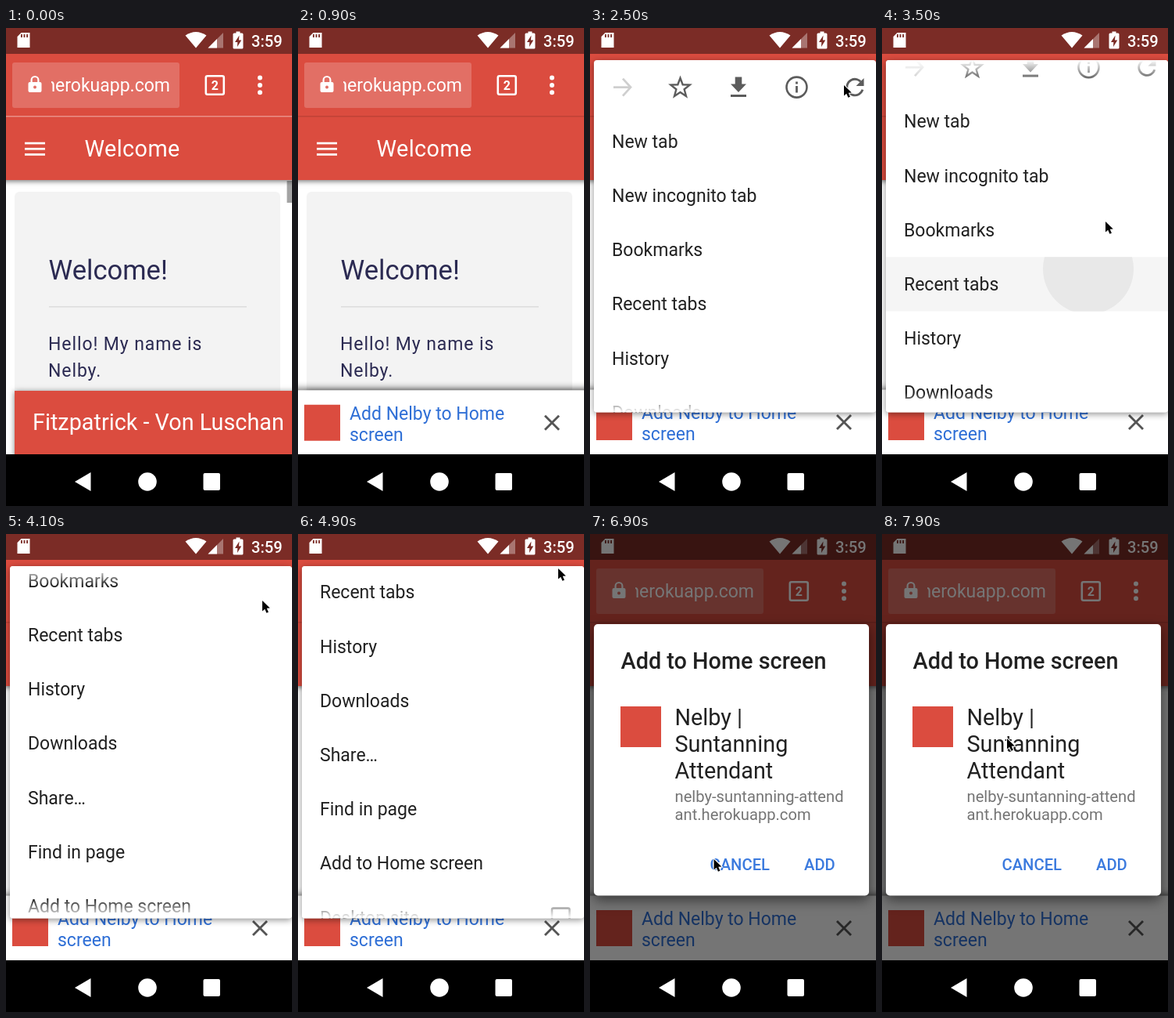
An HTML page with a canvas for the animation above (8000 ms loop, 366 by 610 pixels).

```html
<!DOCTYPE html>
<html lang="en">
<head>
<meta charset="utf-8">
<title>Add to Home screen</title>
<style>
html, body { margin: 0; width: 100%; height: 100%; overflow: hidden; background: #000; }
canvas { display: block; width: 366px; height: 610px; }
</style>
</head>
<body>
<canvas id="stage"></canvas>
<script>
const W = 366, H = 610, LOOP = 8000, STEP = 100;
const RED = '#db4c3f', NAVY = '#2b2a52', BLUE = '#2f6fd6';
const ratio = window.devicePixelRatio || 1;

function makeLayer(canvas) {
  canvas.width = W * ratio;
  canvas.height = H * ratio;
  const ctx = canvas.getContext('2d');
  ctx.scale(ratio, ratio);
  return ctx;
}
const stage = makeLayer(document.getElementById('stage'));
const layer = makeLayer(document.createElement('canvas'));
let g = stage;

// Piecewise linear value from [time, value] pairs.
function track(keys, t) {
  if (t <= keys[0][0]) return keys[0][1];
  for (let i = 1; i < keys.length; i++) {
    const [t0, v0] = keys[i - 1], [t1, v1] = keys[i];
    if (t <= t1) return v0 + (v1 - v0) * (t - t0) / (t1 - t0);
  }
  return keys[keys.length - 1][1];
}
const ramp = (t, a, b) => Math.min(1, Math.max(0, (t - a) / (b - a)));
const easeOut = p => 1 - (1 - p) ** 3;

function rect(x, y, w, h, color, r = 0) {
  g.fillStyle = color;
  g.beginPath();
  g.roundRect(x, y, w, h, r);
  g.fill();
}
function disc(x, y, r, color) {
  g.fillStyle = color;
  g.beginPath();
  g.arc(x, y, r, 0, 7);
  g.fill();
}
function poly(points, color) {
  g.fillStyle = color;
  g.beginPath();
  points.forEach(([x, y]) => g.lineTo(x, y));
  g.closePath();
  g.fill();
}
function line(points, color, width) {
  g.strokeStyle = color;
  g.lineWidth = width;
  g.beginPath();
  points.forEach(([x, y], i) => i ? g.lineTo(x, y) : g.moveTo(x, y));
  g.stroke();
}
function frame(x, y, w, h, color, width, r = 0) {
  g.strokeStyle = color;
  g.lineWidth = width;
  g.beginPath();
  g.roundRect(x, y, w, h, r);
  g.stroke();
}
function text(s, x, y, size, color, { weight = 400, space = 0, align = 'left' } = {}) {
  g.font = `${weight} ${size}px Roboto, sans-serif`;
  g.letterSpacing = space + 'px';
  g.textAlign = align;
  g.fillStyle = color;
  g.fillText(s, x, y);
}
function shadowed(blur, dy, alpha, draw) {
  g.save();
  g.shadowColor = `rgba(0,0,0,${alpha})`;
  g.shadowBlur = blur * ratio;
  g.shadowOffsetY = dy * ratio;
  draw();
  g.restore();
}
function clipTo(x, y, w, h, r, draw) {
  g.save();
  g.beginPath();
  g.roundRect(x, y, w, h, r);
  g.clip();
  draw();
  g.restore();
}

function statusBar() {
  rect(0, 0, W, 33, '#7b2c26');
  poly([[19.5, 6], [30.5, 6], [30.5, 25], [14.5, 25], [14.5, 11]], '#fff');
  for (let i = 0; i < 3; i++) rect(19 + i * 3.6, 8, 1.8, 4, '#7b2c26');
  g.fillStyle = '#fff';
  g.beginPath();
  g.moveTo(243, 25.5);
  g.lineTo(229.5, 9.5);
  g.quadraticCurveTo(243, 0.5, 256.5, 9.5);
  g.fill();
  poly([[278, 6], [278, 25.5], [258.5, 25.5]], 'rgba(255,255,255,.35)');
  poly([[270, 14], [270, 25.5], [258.5, 25.5]], '#fff');
  rect(294.5, 4.5, 5, 4, '#fff');
  rect(290.5, 6.5, 13, 20, '#fff', 1.5);
  poly([[298.5, 9.5], [293, 18], [296.3, 18], [296, 24], [301.3, 15.5], [298, 15.5]], '#7b2c26');
  text('3:59', 314, 23.5, 20.2, '#fff', { weight: 500 });
}

function browserBar(t) {
  rect(0, 33, W, 80, RED);
  rect(8, 44, 214, 58, '#e26f65', 3);
  rect(28.5, 69, 17, 13, '#fff', 2);
  g.strokeStyle = '#fff';
  g.lineWidth = 2.2;
  g.beginPath();
  g.moveTo(32.6, 70);
  g.lineTo(32.6, 66.4);
  g.arc(37, 66.4, 4.4, Math.PI, 0);
  g.lineTo(41.4, 70);
  g.stroke();
  disc(37, 75.5, 2, '#e26f65');
  clipTo(58, 44, 164, 58, 0, () =>
    text('herokuapp.com', 210, 80.5, 23, '#fff', { align: 'right' }));
  frame(255.8, 61.3, 23, 23.4, '#fff', 2.6, 2);
  text('2', 267.3, 79, 16, '#fff', { weight: 700, align: 'center' });
  for (let i = 0; i < 3; i++) disc(325, 63.6 + i * 9.3, 3, '#fff');
  rect(0, 112, W, 1.5, t < 300 ? '#ea9088' : '#c04236');
}

function page(t) {
  rect(0, 113, W, 431, '#fff');
  rect(11, 209, 340, 335, '#f3f3f3', 6);
  text('Welcome!', 54.5, 321, 34.6, NAVY);
  rect(55, 355, 253, 1.6, '#dcdcdc');
  text('Hello! My name is', 54, 410.5, 23, NAVY, { space: 0.9 });
  text('Nelby.', 54, 445, 23, NAVY, { space: 0.9 });
  shadowed(7, 1, 0.5, () => rect(11, 463, 360, 90, RED));
  text('Fitzpatrick - Von Luschan', 34, 512.5, 28.8, '#fff');
  const bar = 1 - ramp(t, 300, 700);
  if (bar) rect(359.5, 195, 6.5, 28, `rgba(140,140,140,${0.8 * bar})`);
  shadowed(6, 2, 0.5, () => rect(-10, 113, W + 20, 81, RED));
  for (let i = 0; i < 3; i++) rect(24, 145.7 + i * 7.2, 26, 2.7, '#fff');
  text('Welcome', 100.5, 164, 28.8, '#fff', { space: 0.4 });
}

function banner(t) {
  const p = easeOut(ramp(t, 500, 1000));
  if (!p) return;
  clipTo(0, 0, W, 544, 0, () => {
    g.translate(0, 84 * (1 - p));
    shadowed(9, -2, 0.6, () => rect(-12, 461.5, W + 24, 90, '#fff'));
    rect(8, 480, 46, 46, RED);
    text('Add Nelby to Home', 66, 499, 23, BLUE);
    text('screen', 66, 526, 23, BLUE);
    line([[316, 494], [334, 512]], '#555', 2.8);
    line([[334, 494], [316, 512]], '#555', 2.8);
  });
}

function navBar() {
  rect(0, 544, W, 66, '#000');
  poly([[88, 579], [108.5, 567], [108.5, 591]], '#fff');
  disc(181, 579, 11.8, '#fff');
  rect(252.5, 568, 21.5, 22, '#fff', 2);
}

const ROWS = ['New tab', 'New incognito tab', 'Bookmarks', 'Recent tabs', 'History',
  'Downloads', 'Share…', 'Find in page', 'Add to Home screen', 'Desktop site'];
const ROW_H = 69.2, TOP = 41, BOTTOM = 490.5;
const SCROLL = [[3400, 0], [3500, 25.5], [3700, 108], [3900, 180], [4100, 223.4], [4600, 275], [4800, 278]];

function menuIcons(y) {
  const ink = '#5c5c5c', x = i => 41 + i * 74.5;
  line([[x(0) - 11, y], [x(0) + 11, y]], '#cfcfcf', 2.8);
  line([[x(0) + 1, y - 11], [x(0) + 11, y], [x(0) + 1, y + 11]], '#cfcfcf', 2.8);
  const star = Array.from({ length: 12 }, (_, i) => {
    const r = i % 2 ? 5.4 : 12.8, a = (i * 36 - 90) * Math.PI / 180;
    return [x(1) + r * Math.cos(a), y + 1 + r * Math.sin(a)];
  });
  line(star, ink, 2.4);
  rect(x(2) - 10, y + 9.5, 20, 2.9, ink);
  poly([[x(2) - 4.3, y - 13], [x(2) + 4.3, y - 13], [x(2) + 4.3, y - 4], [x(2) + 10, y - 4],
    [x(2), y + 6.5], [x(2) - 10, y - 4], [x(2) - 4.3, y - 4]], ink);
  frame(x(3) - 13, y - 13, 26, 26, ink, 2.6, 13);
  rect(x(3) - 1.4, y - 1.5, 2.8, 8.5, ink);
  rect(x(3) - 1.4, y - 7, 2.8, 2.8, ink);
  g.lineWidth = 2.8;
  g.beginPath();
  g.arc(x(4), y, 10.3, 0.3, 5.5);
  g.stroke();
  poly([[x(4) + 11.5, y - 11.5], [x(4) + 11.5, y - 1.5], [x(4) + 1.5, y - 1.5]], ink);
}

function edgeFade(y0, y1) {
  const fade = g.createLinearGradient(0, y0, 0, y1);
  fade.addColorStop(0, 'rgba(255,255,255,1)');
  fade.addColorStop(1, 'rgba(255,255,255,0)');
  g.fillStyle = fade;
  g.fillRect(0, Math.min(y0, y1), W, Math.abs(y1 - y0));
}

function menuBody(t) {
  const scroll = track(SCROLL, t);
  shadowed(8, 2, 0.45, () => rect(5, TOP, 361, BOTTOM - TOP, '#fff', 4));
  clipTo(5, TOP, 361, BOTTOM - TOP, 4, () => {
    menuIcons(TOP + ROW_H / 2 - scroll);
    ROWS.forEach((label, i) => {
      const y = TOP + ROW_H * (i + 1) - scroll;
      if (i === 3 && t >= 3300 && t < 3700) {
        rect(5, y, 361, ROW_H, '#f5f5f5');
        clipTo(5, y, 361, ROW_H, 0, () => disc(264, y + 15, 20 + 38 * ramp(t, 3300, 3500), '#e8e8e8'));
      }
      if (i === 8 && t >= 6200) rect(5, y, 361, ROW_H, '#f2f2f2');
      text(label, 28, y + ROW_H / 2 + 8, 23, '#212121');
      if (i === 9) frame(325, y + ROW_H / 2 - 12, 22.5, 23, '#666', 2.6, 2);
    });
    if (scroll) edgeFade(TOP, TOP + 25);
    edgeFade(BOTTOM, BOTTOM - 25);
  });
}

function menu(t) {
  if (t < 2300 || t >= 6700) return;
  const opening = t < 4000;
  const alpha = opening ? track([[2300, 0.35], [2400, 0.85], [2500, 1]], t)
    : track([[6400, 1], [6500, 0.75], [6600, 0.25]], t);
  const scale = opening ? track([[2300, 0.6], [2400, 0.9], [2500, 1]], t)
    : track([[6400, 1], [6500, 0.895], [6600, 0.82]], t);
  g = layer;
  g.clearRect(0, 0, W, H);
  menuBody(t);
  g = stage;
  g.save();
  g.globalAlpha = alpha;
  g.translate(348, 50);
  g.scale(scale, scale);
  g.drawImage(layer.canvas, -348, -50, W, H);
  g.restore();
}

function dialogBody() {
  shadowed(16, 6, 0.5, () => rect(5, 115, 352, 346.5, '#fff', 5));
  text('Add to Home screen', 39.5, 171.5, 28.8, '#212121', { weight: 500 });
  rect(39, 220, 52, 52, RED);
  ['Nelby |', 'Suntanning', 'Attendant'].forEach((s, i) =>
    text(s, 108.5, 243.5 + i * 34, 28.8, '#212121'));
  text('nelby-suntanning-attend', 108.5, 341.5, 20.2, '#757575');
  text('ant.herokuapp.com', 108.5, 365, 20.2, '#757575');
  text('CANCEL', 153.5, 429, 20.2, '#3b7ade', { weight: 500 });
  text('ADD', 274, 429, 20.2, '#3b7ade', { weight: 500 });
}

function dialog(t) {
  const dim = ramp(t, 6600, 6900), p = ramp(t, 6650, 6900);
  if (!dim) return;
  rect(0, 0, W, 544, `rgba(0,0,0,${0.54 * dim})`);
  if (!p) return;
  g = layer;
  g.clearRect(0, 0, W, H);
  dialogBody();
  g = stage;
  const scale = 0.9 + 0.1 * easeOut(p);
  g.save();
  g.globalAlpha = p;
  g.translate(181, 288);
  g.scale(scale, scale);
  g.drawImage(layer.canvas, -181, -288, W, H);
  g.restore();
}

const POINTER_X = [[1600, 372], [1900, 343], [2100, 325], [2500, 325], [3200, 264], [3300, 264],
  [3500, 286], [4100, 328], [4900, 333], [5300, 333], [6100, 152], [6500, 158], [7900, 160]];
const POINTER_Y = [[1600, 36], [1900, 58], [2100, 73], [2500, 73], [3200, 332], [3300, 332],
  [3500, 247], [3900, 118], [4100, 85], [4600, 47], [4900, 44], [5300, 44], [6100, 424],
  [6500, 421], [6900, 415], [7600, 261]];

function pointer(t) {
  if (t < 1600) return;
  const x = track(POINTER_X, t), y = track(POINTER_Y, t);
  const arrow = [[0, 0], [0, 13.6], [3.2, 10.7], [5.4, 15.8], [7.9, 14.7], [5.7, 9.8], [9.8, 9.6]]
    .map(([dx, dy]) => [x + dx, y + dy]);
  line([...arrow, arrow[0], arrow[1]], '#fff', 2);
  poly(arrow, '#000');
}

function draw(now) {
  const t = Math.floor((now % LOOP) / STEP) * STEP;
  g = stage;
  page(t);
  browserBar(t);
  statusBar();
  banner(t);
  navBar();
  menu(t);
  dialog(t);
  pointer(t);
}

let start;
function tick(now) {
  start ??= now;
  draw(now - start);
  requestAnimationFrame(tick);
}
draw(0);
requestAnimationFrame(tick);
</script>
</body>
</html>
```
